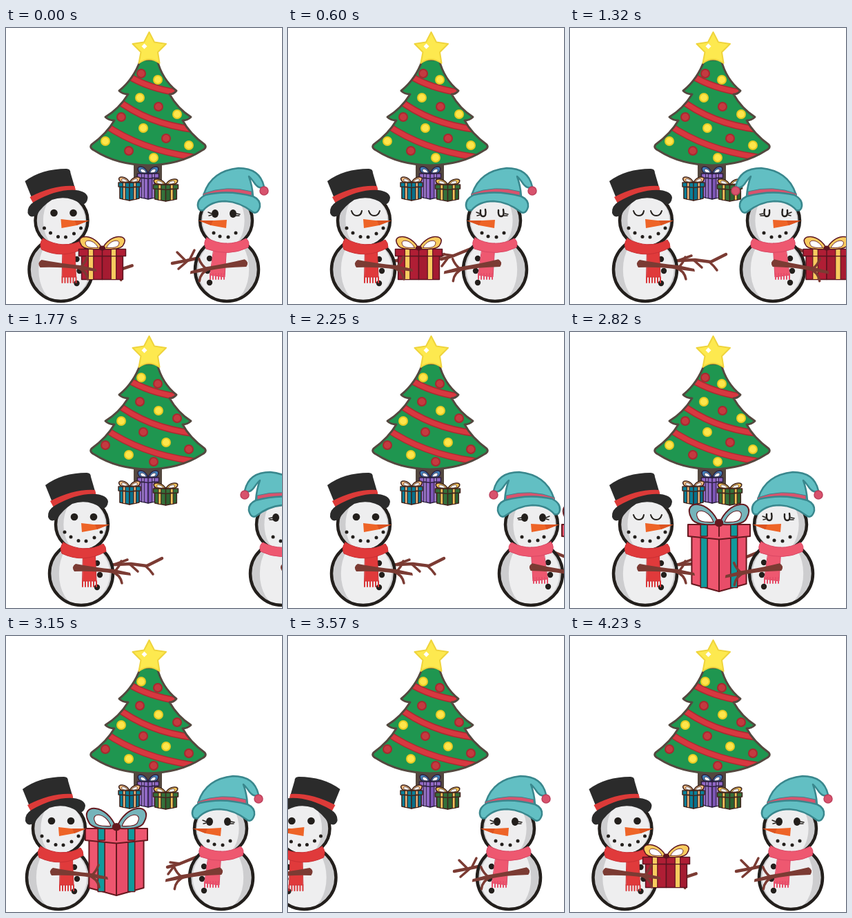
These frames come from a looping animation (400x400 px, 4260 ms). An HTML page:

```html
<!DOCTYPE html>
<html>
<head>
<meta charset="utf-8">
<style>
  html, body { margin: 0; height: 100%; overflow: hidden; background: #fff; }
  svg { display: block; width: 100vw; height: 100vh; }
</style>
</head>
<body>
<svg id="stage" viewBox="0 0 400 400" stroke-linejoin="round" stroke-linecap="round"></svg>
<script>
const INK = '#231f1c', WOOD = '#7b3b33';
const path = (d, fill, stroke = 'none', width = 1) =>
  `<path d="${d}" fill="${fill}" stroke="${stroke}" stroke-width="${width}"/>`;
const line = (d, stroke, width) => path(d, 'none', stroke, width);
const dot = (x, y, r, fill, extra = '') => `<circle cx="${x}" cy="${y}" r="${r}" fill="${fill}" ${extra}/>`;
const group = (inner, attrs = '') => `<g ${attrs}>${inner}</g>`;
const dots = (points, r) => points.map(([x, y]) => dot(x, y, r, INK)).join('');

// A gift box; the origin is the middle of the lid's top edge.
function gift({ w, h, lid, bow, v, left, right, ribbon, loop = ribbon, ink, lw = 1.5 }) {
  const a = w * .44, b = w / 2, r = w * .055;
  const strip = (x, top, bottom) => path(`M${x - r},${top}H${x + r}V${bottom}H${x - r}Z`, ribbon, ink, lw * .8);
  const half = s => {
    const d = `M0,0C${-.15 * w * s},${-1.3 * bow} ${-.6 * w * s},${-1.25 * bow} ${-.45 * w * s},${-.35 * bow}` +
      `C${-.4 * w * s},${.1 * bow} ${-.1 * w * s},0 0,0Z`;
    return path(d, loop, ink, lw) +
      group(path(d, '#fff', ink, lw), `transform="translate(${-.09 * w * s} ${-.12 * bow}) scale(.56)"`);
  };
  return path(`M${-a},${lid}V${h - v}L0,${h}V${lid}Z`, left, ink, lw) +
    path(`M${a},${lid}V${h - v}L0,${h}V${lid}Z`, right, ink, lw) +
    strip(-a * .55, lid, h - v * .5) + strip(a * .55, lid, h - v * .5) +
    path(`M${-b},0H${b}V${lid}L0,${lid + v * .4}L${-b},${lid}Z`, left, ink, lw) +
    strip(-a * .55, 0, lid) + strip(a * .55, 0, lid) + line(`M0,0V${lid}`, ink, lw) +
    half(1) + half(-1) + `<ellipse cy="${-bow * .08}" rx="${w * .07}" ry="${bow * .2}" fill="${ink}"/>`;
}

const RED = gift({ w: 68, h: 44, lid: 10, bow: 18, v: 0, left: '#b01e35', right: '#a51b31', ribbon: '#f8cb5f', ink: '#5b1420' });
const PINK = gift({ w: 90, h: 97, lid: 17, bow: 29, v: 11, left: '#ee566f', right: '#e84d69', ribbon: '#109a9c', loop: '#75b4ba', ink: '#65191f', lw: 2 });

function tree() {
  const shape = 'M195,46Q185,74 164,91Q169,96 177,96Q164,117 144,129Q149,134 157,134Q146,153 124,169' +
    'Q120,174 129,178Q160,198 206,199Q252,198 283,178Q292,174 288,169Q266,153 256,134Q263,134 268,129' +
    'Q249,117 237,96Q243,96 247,91Q226,74 219,46Z';
  const bands = 'M177,69Q205,87 250,94M158,102Q205,139 272,147M143,140Q195,176 270,187';
  const presents =
    group(gift({ w: 31, h: 37, lid: 6, bow: 10, v: 3, left: '#9168c7', right: '#7c55b5', ribbon: '#b18be0', loop: '#4383bd', ink: '#2d2140' }), 'transform="translate(206 211)"') +
    group(gift({ w: 32, h: 26, lid: 6, bow: 8, v: 3, left: '#09809a', right: '#08708b', ribbon: '#f6bd83', ink: '#41251d' }), 'transform="translate(179 224)"') +
    group(gift({ w: 36, h: 24, lid: 6, bow: 8, v: 3, left: '#34713a', right: '#2c6432', ribbon: '#f5c55a', ink: '#41251d' }), 'transform="translate(231.500 227)"');
  return path('M185,194H226V236H185Z', '#54483f') +
    path(shape, '#1f9650') +
    group(line(bands, '#ad2830', 10) + line(bands, '#d73840', 7), 'clip-path="url(#fir)"') +
    `<clipPath id="fir"><path d="${shape}"/></clipPath>` +
    line(shape, '#54483f', 3) + presents +
    path('M207.500,6L215,20.500L232,23L220,35L222.500,51Q207,40 192.500,51L195.500,35L183.500,23L200,20.500Z', '#fde94f', '#efd43c', 2) +
    path('M200.500,22.500L204.500,26.500L200.500,30.500L196.500,26.500Z', '#fff');
}

const bulbs = [[196, 66], [220, 75, 1], [194, 101, 1], [221, 114], [248, 125, 1], [167, 129], [199, 145, 1],
  [232, 160], [144, 164, 1], [178, 178], [265, 170, 1], [214, 188, 1]];
const lights = flip => bulbs.map(([x, y, on = 0]) => on ^ flip
  ? dot(x, y, 6, '#fde64b', 'stroke="#e9cb22" stroke-width="2"')
  : dot(x, y, 6, '#c43a40', 'stroke="#a9282f" stroke-width="2"')).join('');

// A snowball whose shaded side is on the left for s = 1.
const ball = (x, y, r, s) => group(
  dot(0, 0, r, '#cdcdcf') +
  path(`M${-r * .1},${-r}A${r},${r} 0 0 1 ${-r * .1},${r}A${r * .6},${r} 0 0 1 ${-r * .1},${-r}Z`, '#eeeeef') +
  dot(0, 0, r, 'none', `stroke="${INK}" stroke-width="4.500"`),
  `transform="translate(${x} ${y}) scale(${s} 1)"`);

const fringe = (x, y, color) => line([0, 4, 8, 12, 16, 20].map(i => `M${x + i},${y}v8`).join(''), color, 2);

function man(closed) {
  const face = closed
    ? line('M-17,265Q-15,272 -9,272Q-3,272 -2,265M8,265Q10,272 16,272Q22,272 24,265', INK, 2)
    : dot(-10, 268, 5.3, INK) + dot(18, 268, 5.3, INK);
  return ball(0, 350, 46, 1) + ball(1, 279, 38, 1) +
    dots([[23, 335], [27, 352], [23, 370]], 4.2) +
    dots([[-24, 290], [-15, 297], [-4, 302.5], [7, 303], [19, 298], [29, 290]], 2.5) + face +
    path('M0,277L18,279L41,279L23,286L1,290Z', '#ee6427') + path('M20,279L41,279L23,286Z', '#dc5320') +
    path('M3,314L20,313L22,361L2,361Z', '#e03a3b', '#c93034', 1) + fringe(2, 361, '#d93538') +
    path('M-26,305Q5,322 32,307Q36,311 36,318Q4,336 -28,321Q-32,312 -26,305Z', '#e03a3b', '#c93034', 1) +
    path('M-52,222Q-28,204 8,204Q14,204 14,210L21,234L-39,254Z', '#2b2b2b') +
    path('M-45,245Q-10,227 20,229L22,238L-39,256Z', '#dc3a38') +
    path('M-39,252Q-6,233 22,235Q38,237 39,246Q38,255 31,256Q10,241 -13,249Q-27,258 -35,271Q-45,277 -48,268Q-49,258 -39,252Z', '#2b2b2b');
}

function woman(closed) {
  const eye = x => closed
    ? line(`M${x - 4},264Q${x - 5},273 ${x},273Q${x + 5},273 ${x + 3},263`, INK, 2.4)
    : `<ellipse cx="${x}" cy="269" rx="5" ry="6" fill="${INK}"/>`;
  return ball(0, 350, 46, -1) + ball(-1, 279, 38, -1) +
    dots([[-25, 334], [-28, 352], [-25, 369]], 4.2) +
    dots([[-19, 297], [-10, 302], [2, 303], [13, 297]], 2.5) + eye(-17) + eye(9) +
    line('M-22,269l-5,-2M-22,271l-4,1M14,269l5,1M13,272l5,0', INK, 1.4) +
    path('M0,278L-18,279L-41,279L-23,286L-1,290Z', '#ee6427') + path('M-20,279L-41,279L-23,286Z', '#dc5320') +
    path('M-18,314L0,312L-3,361L-24,358Z', '#ee5870', '#da4864', 1) + fringe(-24, 356, '#e64e69') +
    path('M-29,304Q-1,320 28,305Q34,310 31,318Q3,332 -30,320Q-35,311 -29,304Z', '#ee5870', '#da4864', 1) +
    path('M-33,240Q-22,207 17,203Q48,203 54,230Q47,234 41,226Q34,216 32,215Q37,229 38,244Z', '#62bfc3', '#39878d', 2.5) +
    dot(54, 236, 6, '#d8536d', 'stroke="#bd3f5b" stroke-width="1.500"') +
    path('M-34,240Q0,227 36,237L36,246Q0,236 -34,246Z', '#d8536d', '#39878d', 1) +
    path('M-42,258Q-43,248 -31,242Q2,234 38,244Q49,249 48,259Q45,270 38,267Q19,252 -2,251Q-23,251 -34,264Q-41,266 -42,258Z', '#62bfc3', '#39878d', 2.5);
}

const frontArm = path('M4,-5Q-3,-1 2,6Q35,5 60,9L84,12L83,8L60,3Q30,0 4,-5Z', WOOD) +
  line('M60,6Q67,0 70,-9M56,6Q69,11 71,23', WOOD, 3.5);
const manReach = line('M30,0L72,-2L95,1L117,-10', WOOD, 4.5) + line('M48,-1L67,-8M93,1Q100,7 104,13M70,-2L82,9', WOOD, 3.5);
const womanRest = line('M-30,331L-58,337L-79,341', WOOD, 4.5) + line('M-60,337L-72,325M-55,336L-70,349M-54,336L-47,322', WOOD, 3.5);
const womanReach = line('M-28,317L-60,330L-78,335', WOOD, 4.5) + line('M-68,333L-77,345M-60,330L-74,328', WOOD, 3.5);

// Stepped tracks: time and the value held from then on.
const tracks = {
  manX: [[0, 79.5], [150, 85], [300, 92], [450, 109], [3120, 76], [3420, 50], [3570, 23.5], [3690, -30], [3810, -90], [3930, -40], [4080, 30], [4230, 79.5]],
  manArm: [[0, -32], [450, -12], [3930, -32]],
  womanX: [[0, 320], [300, 308], [600, 300], [900, 306], [1170, 290], [1320, 294], [1470, 320], [1620, 352], [1770, 400],
    [1920, 470], [2070, 400], [2220, 352], [2370, 322], [2520, 300], [2670, 318], [2820, 306], [3120, 312], [3270, 320]],
  womanArm: [[0, 30], [300, 20], [450, 9], [1170, 2], [3270, 30]],
  // distance from the holder's centre
  giftX: [[0, 60], [300, 68], [450, 80.5], [750, -102], [900, -94], [1020, -82], [1170, 78], [1920, 90],
    [2670, -90], [2970, 95], [3120, 84], [3270, -90], [3930, 60]]
};
const at = (name, t) => tracks[name].findLast(k => k[0] <= t)[1];
const within = (t, a, b) => t >= a && t < b;
const place = (x, s, inner) => group(inner, `transform="translate(${x} 0) scale(${s} 1)"`);

const scenery = tree();
function scene(t) {
  const mx = at('manX', t), wx = at('womanX', t), ma = at('manArm', t), wa = at('womanArm', t);
  const ms = within(t, 3270, 3930) ? -1 : 1, ws = within(t, 1170, 2670) ? -1 : 1;
  const manClosed = within(t, 600, 1620) || within(t, 2520, 3120);
  const womanClosed = within(t, 600, 1470) || within(t, 2820, 3120);
  const big = within(t, 1920, 3930);
  const holder = within(t, 750, 2970) ? wx : mx;
  const tick = Math.floor((t < 3660 ? t : t - 60) / 150);
  const pull = ma + 12;
  return scenery + lights(tick % 2) +
    place(mx, ms, group(manReach, `transform="translate(${pull * .7} 338) rotate(${-pull * .4})"`)) +
    place(wx, ws, wa > 15 ? womanRest : womanReach) +
    place(mx, ms, man(manClosed)) + place(wx, ws, woman(womanClosed)) +
    group(big ? PINK : RED, `transform="translate(${holder + at('giftX', t)} ${big ? 279 : 320.5})"`) +
    place(mx, ms, group(frontArm, `transform="translate(${ma} 341)"`)) +
    place(wx, ws, group(frontArm, `transform="translate(${wa} 340) scale(-1 1) rotate(3)"`));
}

const stage = document.getElementById('stage');
let start, shown;
function frame(now) {
  start ??= now;
  const next = scene((now - start) % 4260);
  if (next !== shown) stage.innerHTML = shown = next;
  requestAnimationFrame(frame);
}
requestAnimationFrame(frame);
</script>
</body>
</html>
```
